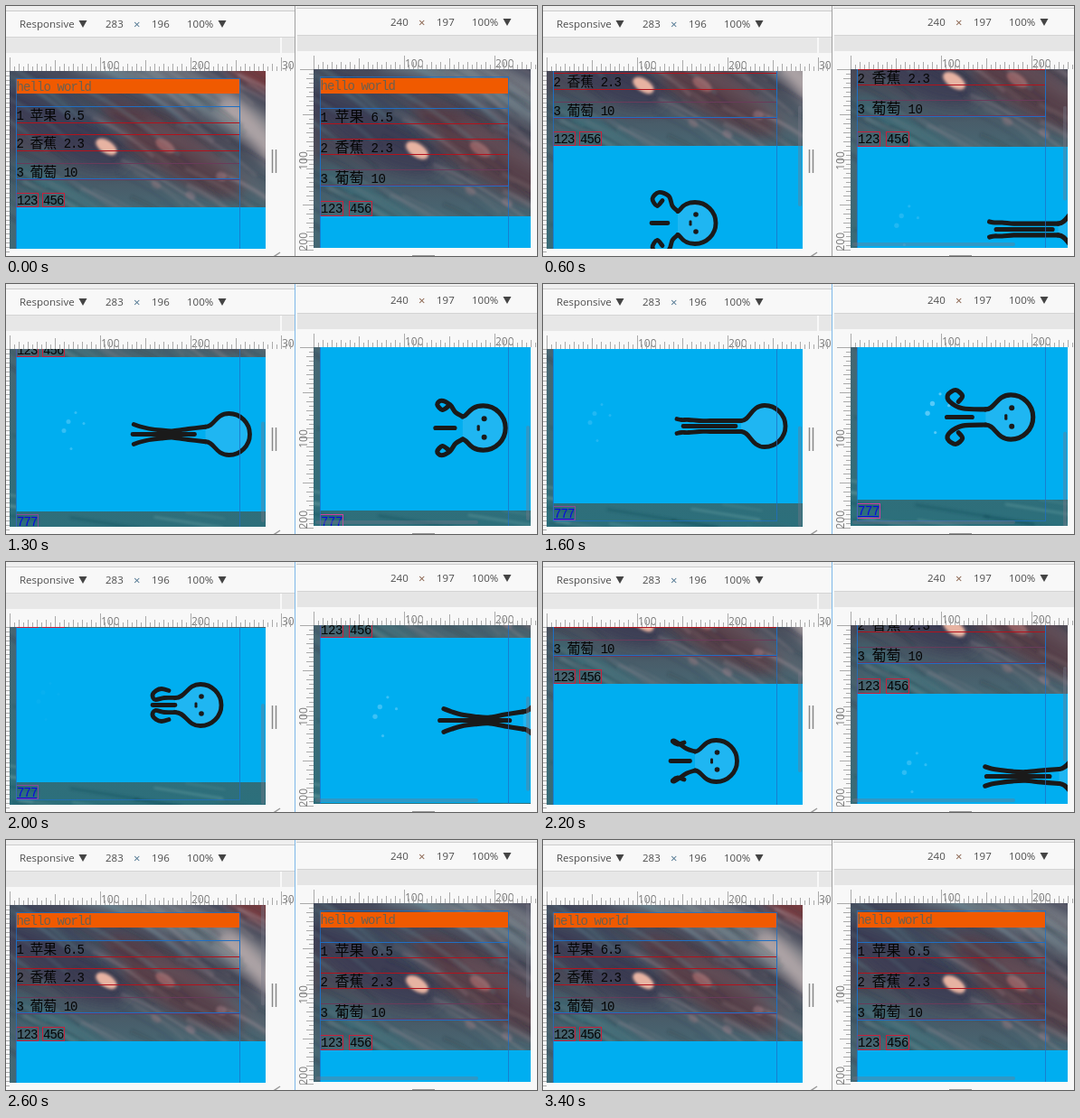
These frames come from a looping animation (587x277 px, 3500 ms). An HTML page:

```html
<!DOCTYPE html>
<html lang="zh">
<head>
<meta charset="utf-8">
<title>Synced scrolling</title>
<style>
html, body { margin: 0; width: 100%; height: 100%; overflow: hidden; background: #f8f8f8; }
svg { display: block; width: 587px; height: 277px; }
.ui { font: 11.5px "Open Sans", sans-serif; fill: #4d4d4d; }
.num { font: 12px "Open Sans", sans-serif; fill: #7c7c7c; }
.mono { font-family: "Liberation Mono", monospace; }
.han { font-family: "Noto Sans CJK SC", "Noto Sans CJK", sans-serif; font-weight: 300; }
</style>
</head>
<body>
<svg id="stage" viewBox="0 0 587 277" xmlns="http://www.w3.org/2000/svg"></svg>
<script>
const LOOP = 3500, SWIM = 1800, VIDEO_H = 171;

// Both views: origin, size and the document layout inside them
const views = [
  { x: 4, y: 72, w: 283, h: 197, k: 1, bar: [9, 16], bodyW: 247, rows: [39, 70, 102], rowH: 18, ul: 80,
    chars: 7.45, tags: 135, tagH: 15, tagX: [7, 36], tagW: 24, video: 151, link: 325, bottom: 341, total: 348,
    thumbX: 278, lag: 0 },
  { x: 340, y: 70, w: 240, h: 198, k: 1.07, bar: [10, 17], bodyW: 208, rows: [43, 77, 111], rowH: 17, ul: 86,
    chars: 8, tags: 146, tagH: 16, tagX: [7, 39], tagW: 25, video: 163, link: 350, bottom: 369, total: 374,
    thumbX: 235, lag: 1000 }
];
const fruit = [['1', '苹果', '6.5'], ['2', '香蕉', '2.3'], ['3', '葡萄', '10']];

// time, left scroll, right scroll
const scrollKeys = [
  [0, 0, 0], [300, 0, 0], [600, 68, 77], [1000, 115, 127], [1400, 151, 177],
  [1700, 151, 177], [2000, 150, 149], [2400, 25, 25], [2600, 0, 0], [3500, 0, 0]
];

// time, head x, middle arm from/to, then arm points from neck to tip
const poses = [
  [200, 211, -53, -28, -28, -8, -40, -8, -50, -6, -53, -11, -49, -16, -43, -18, -35, -16],
  [600, 164, -48, -30, -19, -13, -25, -19, -29, -30, -40, -34, -47, -27, -42, -19, -36, -25],
  [800, 166, -66, -40, -26, -8, -50, -9, -63, -16, -65, -23, -57, -28, -50, -22, -54, -16],
  [1000, 181, -90, -38, -26, -7, -45, -6, -65, -6, -76, -8, -79, -14, -77, -20, -70, -21],
  [1200, 243, -112, -40, -26, -9, -45, -6, -62, -3, -76, -4, -90, -6, -100, -9, -108, -12],
  [1600, 241, -90, -32, -26, -6, -45, -6, -60, -6, -72, -6, -84, -7, -92, -7, -97, -8]
];
poses.push([poses[0][0] + SWIM, ...poses[0].slice(1)]);

const rect = (x, y, w, h, fill, more = '') =>
  `<rect x="${x}" y="${y}" width="${w}" height="${h}" fill="${fill}" ${more}/>`;
const box = (x, y, w, h, color, more = '') =>
  rect(x + .5, y + .5, w, h, 'none', `stroke="${color}" ${more}`);
const line = (x1, y1, x2, y2, color, more = '') =>
  `<path d="M${x1} ${y1}L${x2} ${y2}" stroke="${color}" fill="none" ${more}/>`;
const stroke = (d, color, width, opacity) =>
  `<path d="${d}" stroke="${color}" stroke-width="${width}" opacity="${opacity}" fill="none"/>`;
const text = (x, y, str, cls, more = '') => `<text x="${x}" y="${y}" class="${cls}" ${more}>${str}</text>`;
const mono = (x, y, str, step, fill = '#050505') =>
  text(x, y, str, 'mono', `font-size="14" letter-spacing="${(step - 8.4).toFixed(2)}" fill="${fill}"`);
const arrow = (x, y) => `<path d="M${x - 4.5} ${y - 4}h9l-4.5 8z" fill="#444"/>`;

function rng(seed) {
  return () => (seed = (seed * 16807) % 2147483647) / 2147483647;
}

function between(keys, t) {
  let i = 0;
  while (i < keys.length - 2 && t >= keys[i + 1][0]) i++;
  const a = keys[i], b = keys[i + 1];
  const u = Math.min(1, Math.max(0, (t - a[0]) / (b[0] - a[0])));
  return a.slice(1).map((v, j) => v + (b[j + 1] - v) * u);
}

const spots = list => list.map(([x, y, rx, ry, fill, o]) =>
  `<ellipse cx="${x}" cy="${y}" rx="${rx}" ry="${ry}" fill="${fill}" opacity="${o}" transform="rotate(33 ${x} ${y})"/>`).join('');

function backdrop() {
  const r = rng(71);
  let s = rect(0, 0, 290, 360, 'url(#base)') + '<g filter="url(#wide)">';
  s += spots([[60, 60, 80, 30, '#393a52', .7], [180, 88, 90, 26, '#5c3840', .7],
    [270, -6, 40, 22, '#7c3c40', .9], [60, 140, 70, 16, '#327680', .5]]);
  s += stroke('M70 -12Q190 10 300 92', '#8aa3a8', 20, .6);
  s += stroke('M150 -10Q230 15 300 70', '#a9b0b0', 16, .55);
  s += stroke('M235 35Q265 55 300 105', '#d3bcba', 22, .65);
  s += stroke('M-10 8Q60 25 130 75', '#4f7884', 8, .5);
  s += stroke('M150 60Q230 90 300 150', '#7d7078', 12, .4);
  s += '</g><g filter="url(#soft)">';
  for (let i = 0; i < 70; i++) {
    const x = r() * 330 - 60, y = r() * 185 - 40, len = 50 + r() * 80;
    const tint = x + y < 110 ? '#6a9aa4' : '#b59ea2';
    s += stroke(`M${x} ${y}q${len * .5} ${len * .2} ${len} ${len * .65}`, i % 2 ? '#252c3c' : tint, 1.5 + r() * 4, .08 + r() * .17);
  }
  for (let i = 0; i < 60; i++) {
    const x = r() * 300 - 40, y = 165 + r() * 190, len = 20 + r() * 70;
    s += line(x, y, x + len, y + len * .16, i % 2 ? '#8fc0be' : '#0f3c4c', `stroke-width="${1 + r() * 2}" opacity="${.2 + r() * .3}"`);
  }
  s += spots([[107, 84, 13, 7, '#f0b9a6', .95], [172, 83, 12, 6, '#b77474', .6],
    [162, 126, 6, 4, '#a98088', .35], [234, 117, 6, 5, '#b58b94', .4], [200, 138, 6, 4, '#b58b94', .35]]);
  return s + '</g>';
}

function page(v, i) {
  const red = '#b3121c', blue = '#1f6fc4';
  let s = `<g transform="scale(${v.k})">${backdrop()}</g>`;
  s += rect(7, v.bar[0], v.bodyW, v.bar[1], '#f05a00');
  s += mono(7.5, v.bar[0] + 12.5, 'hello world', 7.5, '#6a6050');
  fruit.forEach(([n, name, price], j) => {
    const y = v.rows[j], base = y + 14.5;
    s += box(7, y, v.bodyW, v.rowH, j < 2 ? red : '#6a3a5a');
    s += mono(7.5, base, n, v.chars);
    s += text(7.5 + v.chars * 2, base, name, 'han', `font-size="${v.chars * 2}" fill="#050505"`);
    s += mono(7.5 + v.chars * 7, base, price, v.chars);
  });
  s += box(7, v.rows[0], v.bodyW, v.ul, blue);
  s += `<g transform="translate(7 ${v.video}) scale(${v.k})">${rect(0, 0, 304, VIDEO_H, '#00aef0')}<g id="swim${i}"></g></g>`;
  ['123', '456'].forEach((str, j) => {
    s += box(v.tagX[j], v.tags, v.tagW, v.tagH, '#c8203c');
    s += mono(v.tagX[j] + 1, v.tags + 12.8, str, v.chars);
  });
  s += box(7, v.link, v.tagW, v.tagH, i ? '#d040a0' : '#8a4a9a');
  s += mono(8, v.link + 12.8, '777', v.chars, '#0808e0') + line(8, v.link + 14.5, 6 + v.tagW, v.link + 14.5, '#0808e0');
  s += box(7, 8, v.bodyW, v.bottom - 8, blue, 'opacity=".75"');
  return s;
}

function view(v, i) {
  return `<g transform="translate(${v.x} ${v.y})"><clipPath id="clip${i}">${rect(0, 0, v.w, v.h, '#000')}</clipPath>
    <g clip-path="url(#clip${i})"><g id="page${i}">${page(v, i)}</g>
    <rect id="thumb${i}" x="${v.thumbX}" width="4" height="${v.h * v.h / v.total}" rx="2" fill="#778" opacity=".4"/>
    ${i ? rect(2, 192, 180, 4, '#778', 'id="thumbH" rx="2" opacity=".4"') : ''}</g></g>`;
}

function rulers() {
  let s = '';
  const tall = n => n % 100 === 0 ? 15 : n % 50 === 0 ? 12 : n % 10 === 0 ? 8 : 5;
  views.forEach((v, i) => {
    const end = i ? 587 : 319;
    for (let n = 0; v.x + n < end; n += 5) {
      const x = v.x + n + .5;
      s += line(x, v.y, x, v.y - tall(n), '#aaa');
      if (n && n % 100 === 0) s += text(x + .5, v.y - 2, n === 300 ? '30' : n, 'num');
    }
    for (let n = 0; n <= 200; n += 5) {
      const y = v.y + n + .5;
      s += line(v.x, y, v.x - (i ? tall(n) : 4), y, '#aaa');
      if (i && n && n % 100 === 0) s += text(0, 0, n, 'num', `transform="translate(${v.x - 7} ${y + 1}) rotate(-90)" text-anchor="${n === 200 ? 'start' : 'middle'}"`);
    }
  });
  return s;
}

function chrome() {
  let s = rect(0, 0, 587, 277, '#f8f8f8') + rect(0, 0, 319, 5, '#efefef') + line(0, 5.5, 319, 5.5, '#ccc');
  s += rect(321, 0, 266, 2, '#efefef') + line(321, 2.5, 587, 2.5, '#ccc');
  s += rect(0, 35, 303, 17, '#e7e7e7') + rect(305, 35, 14, 17, '#e7e7e7') + rect(322, 33, 265, 17, '#e5e5e5');
  s += line(0, 34.5, 319, 34.5, '#d4d4d4') + line(322, 32.5, 587, 32.5, '#d4d4d4');
  s += rulers() + rect(319, 0, 1, 277, '#a0a0a0', 'id="divider"');
  s += text(15, 24, 'Responsive', 'ui') + arrow(85, 20);
  s += text(110, 24, '283', 'ui') + text(141, 24.5, '×', 'ui', 'style="fill:#4f7590;font-size:13px"');
  s += text(161, 24, '196', 'ui') + text(200, 24, '100%', 'ui') + arrow(239, 20);
  s += text(425, 22, '240', 'ui') + text(456, 22.5, '×', 'ui', 'style="fill:#87604a;font-size:13px"');
  s += text(476, 22, '197', 'ui') + text(515, 22, '100%', 'ui') + arrow(554, 18);
  s += line(294.5, 159, 294.5, 185, '#888', 'stroke-width="1.5"') + line(298.5, 159, 298.5, 185, '#888', 'stroke-width="1.5"');
  s += line(294, 279, 303, 273, '#999', 'stroke-width="1.5"') + line(449, 276.5, 474, 276.5, '#999');
  return s;
}

const defs = `<defs>
  <linearGradient id="base" x2="0" y2="1"><stop stop-color="#464a5c"/><stop offset=".22" stop-color="#4a4a58"/>
    <stop offset=".42" stop-color="#486672"/><stop offset="1" stop-color="#2a707c"/></linearGradient>
  <filter id="wide" x="-.2" y="-.2" width="1.4" height="1.4"><feGaussianBlur stdDeviation="7"/></filter>
  <filter id="soft"><feGaussianBlur stdDeviation="1.4"/></filter>
</defs>`;

// Smooth curve through points, without the opening move
function curve(p) {
  let d = '';
  for (let i = 0; i < p.length - 1; i++) {
    const a = p[i - 1] || p[i], b = p[i], c = p[i + 1], e = p[i + 2] || c;
    d += `C${[0, 1].map(j => b[j] + (c[j] - a[j]) / 6)} ${[0, 1].map(j => c[j] - (e[j] - b[j]) / 6)} ${c}`;
  }
  return d;
}

function pose(p) {
  return between(poses, p < poses[0][0] ? p + SWIM : p);
}

function arm(p, side) {
  const v = pose(p).slice(3), pts = [];
  for (let i = 0; i < v.length; i += 2) pts.push([v[i], v[i + 1] * side]);
  return pts;
}

function swimmer(time) {
  const p = time % SWIM;
  const [x, from, to] = pose(p);
  // the lower arm straightens first
  const lead = 180 * Math.max(0, 1 - Math.abs(p - 1000) / 200);
  const up = arm(p, 1), low = arm(p + lead, -1);
  const [nu, nl] = [up[0], low[0]];
  const head = `M${nu}C-16 ${nu[1]} -15 -23 0 -23A23 23 0 0 1 0 23C-15 23 -16 ${nl[1]} ${nl}`;
  const age = (p - 800 + SWIM) % SWIM;
  let s = '';
  [[86, -24], [78, -14], [95, -12], [73, -4], [81, 16]].forEach(([bx, by], i) => {
    s += `<circle cx="${bx - age * .04}" cy="${by + 85.5}" r="${1.5 + i % 2}" fill="#9be0ff" opacity="${.55 * Math.max(0, 1 - age / 1300)}"/>`;
  });
  s += `<g transform="translate(${x - 7} 85.5)" stroke="#1a1a1a" stroke-width="4.8" stroke-linecap="round" stroke-linejoin="round" fill="none">
    <path d="${head}" fill="#1fb6f2"/><path d="M${nu}${curve(up)}M${nl}${curve(low)}M${from} 0H${to}"/>`;
  if (p < 1300 || p > 1720)
    s += `<g fill="#1a1a1a" stroke="none"><circle cx="1" cy="-9.5" r="2.8"/><circle cx="1" cy="9.5" r="2.8"/>${rect(-6.5, -3, 3, 6, '#1a1a1a', 'rx="1.2"')}</g>`;
  return s + '</g>';
}

const $ = id => document.getElementById(id);
$('stage').innerHTML = defs + chrome() + views.map(view).join('');
const show = (id, on) => $(id).setAttribute('visibility', on ? 'visible' : 'hidden');

function draw(t) {
  const scroll = between(scrollKeys, t);
  views.forEach((v, i) => {
    $('page' + i).setAttribute('transform', `translate(0 ${-Math.round(scroll[i])})`);
    $('swim' + i).innerHTML = swimmer(t + v.lag);
    $('thumb' + i).setAttribute('y', scroll[i] * v.h / v.total);
    show('thumb' + i, t >= 400 && t < 3300);
  });
  show('thumbH', t >= 400);
  // the right window has focus while it leads
  $('divider').setAttribute('fill', t >= 800 && t < 3300 ? '#7db8e8' : '#a0a0a0');
}

let last = -1;
function tick(now) {
  const step = Math.floor((now % LOOP) / 100) * 100;
  const t = step < 400 ? 0 : step;
  if (t !== last) draw(last = t);
  requestAnimationFrame(tick);
}
draw(0);
requestAnimationFrame(tick);
</script>
</body>
</html>
```
